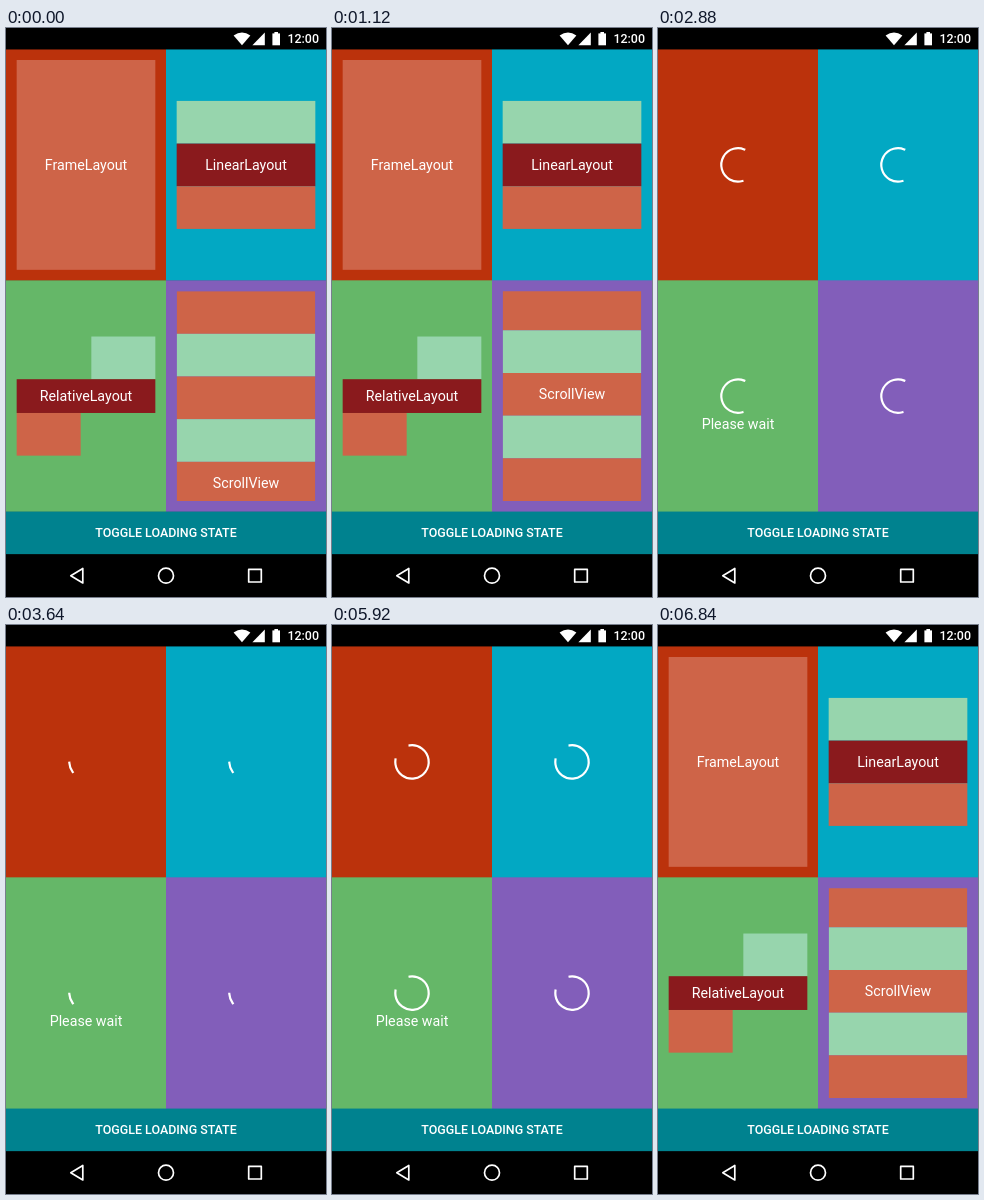
An HTML page with a canvas that plays this animation: 320 px wide and 569 px high, repeating every 8 s.

```html
<!DOCTYPE html>
<html lang="en">
<head>
<meta charset="utf-8">
<title>Loading layouts</title>
<style>
html, body { margin: 0; width: 100%; height: 100%; overflow: hidden; background: #000; }
canvas { display: block; width: 100vw; height: 100vh; }
</style>
</head>
<body>
<canvas id="stage"></canvas>
<script>
const W = 320, H = 569, LOOP = 8000;
const DP = W / 360;
const PAD = 12 * DP, BAR = 48 * DP, STATUS = 24 * DP;
const BUTTON_TOP = H - 2 * BAR;
const CELL_H = (BUTTON_TOP - STATUS) / 2;
const MID = STATUS + CELL_H;
const INNER_W = W / 2 - 2 * PAD, INNER_H = CELL_H - 2 * PAD;

const ORANGE = '#ce6448', MINT = '#97d5ad', MAROON = '#8a1a1d';
const CELLS = ['#bb320c', '#02a8c3', '#65b768', '#825eba'];

const SCROLL_START = 240, SCROLL_END = 1080;
const TAPS = [2520, 6560], TAP_HOLD = 40, TAP_FADE = 240;
const LOAD_START = TAPS[0] + TAP_HOLD, LOAD_END = TAPS[1] + TAP_HOLD;

const canvas = document.getElementById('stage');
const ctx = canvas.getContext('2d');
const scale = window.devicePixelRatio || 1;
canvas.width = Math.round(W * scale);
canvas.height = Math.round(H * scale);

const clamp = v => Math.min(1, Math.max(0, v));

// cubic-bezier(.4, 0, .2, 1)
function ease(x) {
  if (x <= 0 || x >= 1) return clamp(x);
  let lo = 0, hi = 1, u = 0.5;
  for (let i = 0; i < 24; i++) {
    u = (lo + hi) / 2;
    const bx = 1.2 * u * (1 - u) ** 2 + 0.6 * u * u * (1 - u) + u ** 3;
    if (bx < x) lo = u; else hi = u;
  }
  return u * u * (3 - 2 * u);
}

function rect(x, y, w, h, color) {
  ctx.fillStyle = color;
  ctx.fillRect(x, y, w, h);
}

function label(str, x, centerY, size = 16 * DP, weight = 400, align = 'center') {
  ctx.font = `${weight} ${size}px Roboto, sans-serif`;
  ctx.textAlign = align;
  ctx.fillStyle = '#fff';
  ctx.fillText(str, x, centerY + size * 0.342);
}

function polygon(points) {
  ctx.beginPath();
  points.forEach(([x, y]) => ctx.lineTo(x, y));
  ctx.closePath();
}

function drawStatusBar() {
  rect(0, 0, W, STATUS, '#000');
  ctx.fillStyle = '#fff';
  ctx.beginPath();
  ctx.moveTo(236, 17.3);
  ctx.lineTo(227.6, 7.4);
  ctx.quadraticCurveTo(236, 1.4, 244.4, 7.4);
  ctx.closePath();
  ctx.fill();
  polygon([[246.4, 17.2], [258.8, 17.2], [258.8, 4.6]]);
  ctx.fill();
  ctx.fillRect(266.4, 5.4, 7.6, 11.9);
  ctx.fillRect(268.4, 4, 3.6, 2);
  label('12:00', 313, 11, 14 * DP, 500, 'right');
}

function drawNavBar() {
  rect(0, H - BAR, W, BAR, '#000');
  ctx.strokeStyle = '#fff';
  ctx.lineWidth = 1.7;
  ctx.lineCap = 'butt';
  ctx.lineJoin = 'round';
  polygon([[64.8, 547.7], [76.8, 540.4], [76.8, 555]]);
  ctx.stroke();
  ctx.beginPath();
  ctx.arc(160, 547.7, 7.5, 0, 2 * Math.PI);
  ctx.stroke();
  ctx.strokeRect(242.7, 541.4, 12.6, 12.6);
}

function drawButton(t) {
  rect(0, BUTTON_TOP, W, BAR, '#00828f');
  for (const tap of TAPS) {
    const age = t - tap;
    if (age < 0) continue;
    ctx.globalAlpha = 1 - clamp((age - TAP_HOLD) / TAP_FADE);
    rect(0, BUTTON_TOP, W, BAR, '#005e68');
    ctx.globalAlpha = 1;
  }
  label('TOGGLE LOADING STATE', W / 2, BUTTON_TOP + BAR / 2, 14 * DP, 500);
}

function drawTouch(t) {
  if (!TAPS.some(tap => t >= tap && t < tap + TAP_HOLD)) return;
  const x = 218, y = 510, r = 11;
  const glow = ctx.createRadialGradient(x, y, 0, x, y, r);
  glow.addColorStop(0, 'rgba(255,255,255,.66)');
  glow.addColorStop(0.6, 'rgba(255,255,255,.5)');
  glow.addColorStop(0.85, 'rgba(255,255,255,.2)');
  glow.addColorStop(1, 'rgba(255,255,255,0)');
  ctx.fillStyle = glow;
  ctx.beginPath();
  ctx.arc(x, y, r, 0, 2 * Math.PI);
  ctx.fill();
}

function drawScrollView(t) {
  const x = W / 2 + PAD, top = MID + PAD;
  const range = 7 * BAR - INNER_H;
  const shift = range * ease((t - SCROLL_START) / (SCROLL_END - SCROLL_START));
  ctx.save();
  ctx.beginPath();
  ctx.rect(x, top, INNER_W, INNER_H);
  ctx.clip();
  for (let i = 0; i < 7; i++) {
    rect(x, top - shift + i * BAR, INNER_W, BAR, i % 2 ? MINT : ORANGE);
  }
  label('ScrollView', W * 0.75, top - shift + 4.5 * BAR);
  ctx.restore();
}

function drawContent(t) {
  const left = PAD, right = W / 2 + PAD;
  const upper = STATUS + CELL_H / 2, lower = MID + CELL_H / 2;

  rect(left, STATUS + PAD, INNER_W, INNER_H, ORANGE);
  label('FrameLayout', W / 4, upper);

  [MINT, MAROON, ORANGE].forEach((color, i) =>
    rect(right, upper + (i - 1.5) * BAR, INNER_W, BAR, color));
  label('LinearLayout', W * 0.75, upper);

  const band = 38 * DP, box = 72 * DP;
  rect(left + INNER_W - box, lower - band / 2 - BAR, box, BAR, MINT);
  rect(left, lower + band / 2, box, BAR, ORANGE);
  rect(left, lower - band / 2, INNER_W, band, MAROON);
  label('RelativeLayout', W / 4, lower);

  drawScrollView(t);
}

// The head runs ahead in the first half of a cycle, the tail catches up in the second.
function spinnerArc(age) {
  const turns = age / 1333, cycle = Math.floor(turns), p = turns - cycle;
  const base = 5 + 306 * turns + 284 * cycle;
  const head = base + 284 * ease(2 * p);
  const tail = base + 284 * ease(2 * p - 1) - 4;
  return [tail, head].map(deg => deg * Math.PI / 180);
}

function drawLoading(t) {
  const [tail, head] = spinnerArc(t - LOAD_START);
  ctx.strokeStyle = '#fff';
  ctx.lineWidth = 2.2;
  ctx.lineCap = 'square';
  for (const y of [STATUS + CELL_H / 2, MID + CELL_H / 2]) {
    for (const x of [W / 4, W * 0.75]) {
      ctx.beginPath();
      ctx.arc(x, y, 16.7, tail, head);
      ctx.stroke();
    }
  }
  label('Please wait', W / 4, 396);
}

function draw(t) {
  ctx.setTransform(canvas.width / W, 0, 0, canvas.height / H, 0, 0);
  CELLS.forEach((color, i) =>
    rect((i % 2) * W / 2, i < 2 ? STATUS : MID, W / 2, CELL_H, color));
  if (t >= LOAD_START && t < LOAD_END) drawLoading(t);
  else drawContent(t);
  drawButton(t);
  drawStatusBar();
  drawNavBar();
  drawTouch(t);
}

const start = performance.now();
function tick() {
  draw((performance.now() - start) % LOOP);
  requestAnimationFrame(tick);
}
tick();
</script>
</body>
</html>
```
